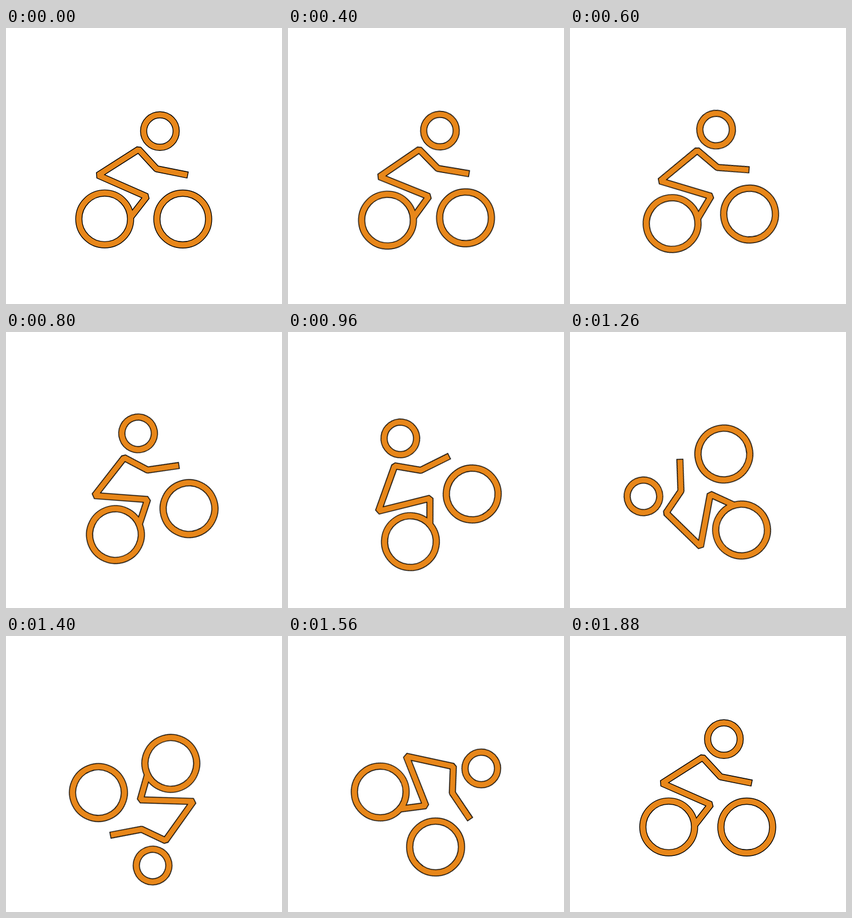
An HTML page for the animation above (1.92 s loop, 512 by 512 pixels).

```html
<!DOCTYPE html>
<html lang="en">
<head>
<meta charset="utf-8">
<title>Tumbling cyclist</title>
<style>
  html, body { margin: 0; width: 100%; height: 100%; overflow: hidden; background: #fff; }
  svg { display: block; width: 100vw; height: 100vh; }
  #rider { transform-origin: 255.9px 307.2px; }
  .edge, .fill { fill: none; }
  .edge { stroke: #000; stroke-width: 13.1; }
  .fill { stroke: #e8871a; stroke-width: 10.2; }
  #body { fill: #e8871a; stroke: #000; stroke-width: 1.5; }
</style>
</head>
<body>
<svg viewBox="0 0 512 512">
  <defs>
    <g id="rings">
      <circle cx="183.1" cy="354.2" r="48"/>
      <circle cx="327.9" cy="354.4" r="48"/>
      <circle cx="285.5" cy="191.2" r="30.2"/>
    </g>
  </defs>
  <g id="rider">
    <use href="#rings" class="edge"/>
    <polygon id="body"/>
    <use href="#rings" class="fill"/>
  </g>
</svg>
<script>
  const LOOP = 1920, HALF = 5.7;

  // hand, elbow, shoulder, hip, knee, foot
  const joints = [[337, 272.8], [279.3, 261.2], [246, 225.2], [170.8, 273.1], [261, 312.8], [231.9, 350.2]];

  function normal(p, q) {
    if (!p || !q) return null;
    const dx = q[0] - p[0], dy = q[1] - p[1], len = Math.hypot(dx, dy);
    return [dy / len, -dx / len];
  }

  const shift = (p, n, d) => [p[0] + n[0] * d, p[1] + n[1] * d];

  // one side of the thick line: bevelled outside a bend, sharp inside it
  function side(points) {
    return points.flatMap((p, i) => {
      const a = normal(points[i - 1], p), b = normal(p, points[i + 1]);
      if (!a || !b) return [shift(p, a || b, HALF)];
      if (a[0] * b[1] > a[1] * b[0]) return [shift(p, a, HALF), shift(p, b, HALF)];
      const dot = a[0] * b[0] + a[1] * b[1];
      return [shift(p, [a[0] + b[0], a[1] + b[1]], HALF / (1 + dot))];
    });
  }

  const outline = [...side(joints), ...side([...joints].reverse())];
  document.getElementById("body").setAttribute("points", outline.join(" "));

  // a slow tilt backwards, then a quick flip that settles
  const pose = (ms, turn, easing = "linear") =>
    ({ offset: ms / LOOP, transform: `rotate(${-turn}deg)`, easing });

  document.getElementById("rider").animate([
    pose(0, 0, "cubic-bezier(.44, 0, .72, 0)"),
    pose(1120, 65.5, "cubic-bezier(.507, .2, .266, 1)"),
    pose(1880, 360),
    pose(LOOP, 360)
  ], { duration: LOOP, iterations: Infinity });
</script>
</body>
</html>
```
